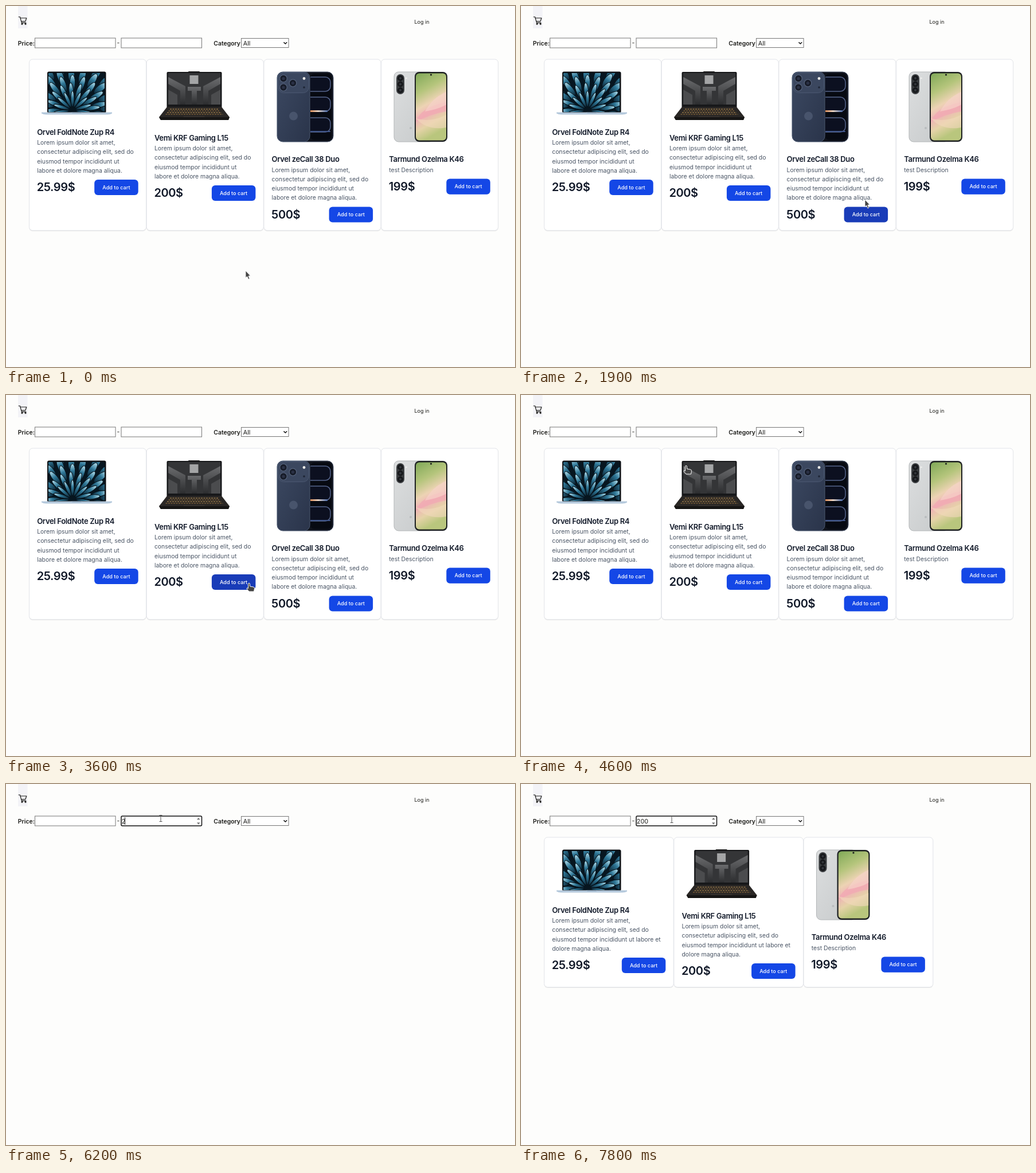
Write an HTML page that moves like this. It is 888 px wide and 630 px high and loops after 8000 ms.

```html
<!DOCTYPE html>
<html lang="en">
<head>
<meta charset="utf-8">
<title>Shop filter</title>
<style>
html, body { margin: 0; width: 100%; height: 100%; overflow: hidden; background: #fdfdfc; }
svg { display: block; }
text { font: 10.42px Inter, "Open Sans", sans-serif; fill: #1b1b18; white-space: pre; }
.label { font-weight: 600; }
.nav { font-size: 9px; }
.field { font-size: 10.8px; }
.title { font-size: 13px; font-weight: 600; letter-spacing: -.33px; fill: #101828; }
.desc { fill: #4a5565; }
.price { font-size: 20px; font-weight: 600; letter-spacing: -.4px; fill: #101828; }
.btn { font-size: 9.1px; font-weight: 500; fill: #fff; text-anchor: middle; }
.box { fill: #fff; stroke: #767676; }
</style>
</head>
<body>
<svg width="888" height="630" viewBox="0 0 888 630">
  <defs>
    <linearGradient id="petal"><stop offset="0" stop-color="#0b2535"/><stop offset=".55" stop-color="#2f7797"/><stop offset="1" stop-color="#b4e0ee"/></linearGradient>
    <linearGradient id="steel" x2="0" y2="1"><stop offset="0" stop-color="#6b6c6e"/><stop offset="1" stop-color="#2c2d2f"/></linearGradient>
    <linearGradient id="navy" x2="1" y2="1"><stop offset="0" stop-color="#3c4962"/><stop offset="1" stop-color="#2a344a"/></linearGradient>
    <linearGradient id="silver" x2="1" y2="1"><stop offset="0" stop-color="#dcdedf"/><stop offset="1" stop-color="#c6c9ca"/></linearGradient>
    <linearGradient id="bloom" x2=".25" y2="1"><stop offset="0" stop-color="#7fa857"/><stop offset=".3" stop-color="#b5c57c"/><stop offset=".52" stop-color="#edd3b4"/><stop offset=".66" stop-color="#efb4b6"/><stop offset=".82" stop-color="#e5d3a8"/><stop offset="1" stop-color="#b9c67d"/></linearGradient>
    <linearGradient id="glow"><stop offset="0" stop-color="#d97b3c"/><stop offset=".5" stop-color="#e8d4c4"/><stop offset="1" stop-color="#4a6aa8"/></linearGradient>
    <clipPath id="lid"><rect x="74" y="117" width="98" height="68" rx="1"/></clipPath>
    <clipPath id="front"><rect x="531" y="118" width="37" height="116" rx="7"/></clipPath>
    <clipPath id="pane"><rect x="715" y="117.500" width="53" height="117" rx="6"/></clipPath>
  </defs>
  <rect width="888" height="630" fill="#fdfdfc"/>
  <rect x="21" width="16.500" height="39" fill="#f3f3f7"/>
  <g fill="none" stroke="#1b1b18" stroke-width="1.200" stroke-linejoin="round" stroke-linecap="round">
    <path d="M22 19h2.400l3 10.300h7.400M24.900 21h10.900l-2 5.800h-7.200"/>
    <circle cx="28" cy="31.300" r="1"/><circle cx="34" cy="31.300" r="1"/>
  </g>
  <text class="nav" x="712.500" y="30.500">Log in</text>
  <text class="label" x="20.800" y="68.500">Price:</text>
  <rect class="box" x="50.500" y="56" width="140.500" height="17"/>
  <text x="193.500" y="68">-</text>
  <rect class="box" id="max" x="201" y="56" width="140.500" height="17"/>
  <path id="spin" d="M333 62.300l2.800-3.500 2.800 3.500zM333 67.300l2.800 3.500 2.800-3.500z" fill="#777"/>
  <text class="field" id="typed" x="201.800" y="68.500"></text>
  <path id="caret" d="M0 58v13" stroke="#111"/>
  <text class="label" x="362.300" y="68.500">Category</text>
  <rect class="box" x="410.500" y="56.500" width="82.500" height="16"/>
  <text class="field" x="413.800" y="68.500">All</text>
  <path d="M484.500 63.200l2.800 2.800 2.800-2.800" fill="none" stroke="#111" stroke-width="1.500"/>
  <g id="wide"></g>
  <g id="narrow"></g>
  <g id="cursor" stroke-linejoin="round">
    <path id="arrow" d="M0 0V12.300L2.800 10 4.900 15 7 14 4.900 9.200 8.300 8.800Z" fill="#444" stroke="#fff" stroke-width=".8"/>
    <path id="hand" d="M-1.500 1.300a1.500 1.500 0 0 1 3 0V5.400l6 1.100q2.200.5 2 2.600L8.600 14.500H0L-4 9.800Q-4.500 8.300-3.100 8.200L-1.500 9.200Z" fill="#444" stroke="#fff"/>
    <path id="beam" d="M-2.500-5.500H2.500M0-5.500v11M-2.500 5.500H2.500" fill="none" stroke="#555"/>
  </g>
</svg>
<script>
const $ = id => document.getElementById(id);
const range = n => [...Array(n).keys()];
const rect = (x, y, w, h, r, fill, more = '') =>
  `<rect x="${x}" y="${y}" width="${w}" height="${h}" rx="${r}" fill="${fill}" ${more}/>`;
const dot = (x, y, r, fill, more = '') => `<circle cx="${x}" cy="${y}" r="${r}" fill="${fill}" ${more}/>`;
const shape = (d, fill, more = '') => `<path d="${d}" fill="${fill}" ${more}/>`;
const text = (cls, x, y, s) => `<text class="${cls}" x="${x}" y="${y}">${s}</text>`;

// Product art, in the coordinates of the four-card layout
function blueLaptop() {
  const petals = range(5).map(ring => range(13 - ring).map(i => {
    const turn = 172 + i * 196 / (12 - ring) + ring % 2 * 7;
    return `<ellipse cx="${76 - ring * 14}" rx="14" ry="${6.5 - ring * .9}" transform="rotate(${turn})"/>`;
  }).join('')).join('');
  return rect(72, 114.5, 102.5, 72.5, 3, '#0c1014') +
    `<g clip-path="url(#lid)">${rect(74, 117, 98, 68, 0, '#071620')}
      <g transform="translate(116 182)" fill="url(#petal)" stroke="#06131c">${petals}</g></g>` +
    shape('M62 185.500H185V187.500Q182 189.500 177 189.500H70Q65 189.500 62 187.500Z', '#b5c9dc') +
    shape('M114 185.500h19l-2 1.500h-15z', '#8da4ba');
}

function darkLaptop() {
  const keys = range(4).map(i => `<path d="M${286 - i * 2.5} ${180 + i * 3}H${371 + i * 2.5}"
    stroke="${i % 2 ? '#8c6a3c' : '#b08a50'}" stroke-width="1.300" stroke-dasharray="3 1.500" opacity=".8"/>`).join('');
  return rect(280.5, 115, 96, 63, 2, '#17181a') + rect(318, 114, 20, 2, 1, '#222') +
    rect(283, 117, 91, 55, 0, '#343537') +
    shape('M283 124L313 140V172H304V148L283 136ZM374 124L344 140V172H353V148L374 136Z', 'url(#steel)') +
    shape('M317 141H340V148H333V172H324V148H317Z', 'url(#steel)') +
    shape('M283 146L299 155V172H283ZM374 146L358 155V172H374Z', '#4b4c4e') +
    rect(320.5, 121, 15, 15, 0, '#a4a5a6') +
    shape('M281 176H376L390 194 388 199H270L267 194Z', '#2a2725') + keys +
    shape('M310 192h36l2 4h-40z', '#35312e') + shape('M267 194H390L388 199H270Z', '#171615');
}

function bluePhone() {
  const lens = (x, y) => dot(x, y, 6.3, '#171c29', 'stroke="#536079" stroke-width="1.300"') + dot(x, y, 2.6, '#2b3145');
  const bands = [124, 159, 195].map(y =>
    rect(515, y, 51, 25, 9, '#0c1020', 'stroke="#56658c" stroke-width="1.500"')).join('');
  return rect(512, 115, 59, 122, 10, '#10131c', 'stroke="#505b70"') +
    `<g clip-path="url(#front)">${rect(525, 116, 48, 120, 0, '#070a12')}${bands}
      ${rect(528, 182, 33, 3, 1, 'url(#glow)')}${rect(528, 218, 38, 2, 1, '#40568a')}</g>` +
    rect(473, 115, 57, 122, 10, 'url(#navy)', 'stroke="#4a5870"') +
    rect(474.5, 116.5, 54, 35, 10, '#3b475f', 'stroke="#4b5871"') +
    lens(484, 126.5) + lens(484, 142) + lens(500.5, 134.5) +
    dot(520, 126.5, 2.4, '#e8e8e6') + dot(520, 142, 1.8, '#1e2534') + dot(501.5, 192, 7.5, '#48546c');
}

function silverPhone() {
  return rect(677, 115, 70, 122, 8, 'url(#silver)', 'stroke="#b3b6b8"') +
    rect(681, 119, 14, 35, 7, '#3b3e41') +
    [126, 136.5, 147].map(y => dot(688, y, 5, '#16181b') + dot(688, y, 2, '#34383d')).join('') +
    dot(698.5, 126, 1.3, '#f2f2ef') + dot(706, 213, 2, '#b9bcbe') +
    rect(713, 115, 57, 122, 8, '#1d2022') +
    `<g clip-path="url(#pane)">${rect(715, 117, 53, 118, 0, 'url(#bloom)')}
      ${shape('M715 202Q724 176 768 168V184Q742 188 715 202Z', '#f2a9b3', 'opacity=".75"')}
      ${shape('M768 150Q744 160 731 184Q756 180 768 172Z', '#f7d3c9', 'opacity=".7"')}
      ${shape('M715 196Q740 204 768 190V212Q735 218 715 196Z', '#f4d9bd', 'opacity=".6"')}</g>` +
    dot(741.5, 120, 1.6, '#17191b');
}

const longText = {
  wide: ['Lorem ipsum dolor sit amet,', 'consectetur adipiscing elit, sed do', 'eiusmod tempor incididunt ut', 'labore et dolore magna aliqua.'],
  narrow: ['Lorem ipsum dolor sit amet,', 'consectetur adipiscing elit, sed do', 'eiusmod tempor incididunt ut labore et', 'dolore magna aliqua.']
};
const shortText = { wide: ['test Description'], narrow: ['test Description'] };
const products = [
  { name: 'Orvel FoldNote Zup R4', price: '25.99$', y: 220, copy: longText, art: blueLaptop },
  { name: 'Vemi KRF Gaming L15', price: '200$', y: 230, copy: longText, art: darkLaptop },
  { name: 'Orvel zeCall 38 Duo', price: '500$', y: 267.5, copy: longText, art: bluePhone },
  { name: 'Tarmund Ozelma K46', price: '199$', y: 267.5, copy: shortText, art: silverPhone }
];
const LEFT = 40.2, WIDE = 204.7;

function card(p, slot, width, height, mode) {
  const x = LEFT + slot * width, home = LEFT + products.indexOf(p) * WIDE;
  const lines = p.copy[mode], end = p.y + 18.3 + (lines.length - 1) * 16.3;
  const bx = x + width - 90.7, by = end + 15.7;
  return rect(x + .3, 94.5, width - .6, height, 6, '#000', 'opacity=".07"') +
    rect(x + .3, 93, width - .6, height, 6, '#fff', 'stroke="#e2e4e9"') +
    `<g transform="translate(${x - home})">${p.art()}</g>` +
    text('title', x + 14, p.y + 4.8, p.name) +
    lines.map((s, i) => text('desc', x + 14, p.y + 22 + i * 16.3, s)).join('') +
    text('price', x + 13.5, end + 36, p.price) +
    rect(bx, by, 76.5, 27.2, 6, '#1447e6', `id="${mode}${products.indexOf(p)}"`) +
    text('btn', bx + 38.2, by + 16.9, 'Add to cart');
}
$('wide').innerHTML = products.map((p, i) => card(p, i, WIDE, 298.7, 'wide')).join('');
$('narrow').innerHTML = products.filter(p => p.price !== '500$')
  .map((p, i) => card(p, i, 226.3, 261.5, 'narrow')).join('');

// Pointer runs: start time, then one point per 100 ms
const STEP = 100;
const runs = [
  [0, [[418, 462]]],
  [1400, [[438, 447], [485, 420], [548, 393], [606, 371], [658, 359], [600, 338], [510, 320], [408, 323], [320, 335]]],
  [2300, [[299, 352], [342, 390], [424, 417], [473, 408]]],
  [3300, [[446, 398], [408, 378]]],
  [3600, [[424, 328.5], [417, 324], [405, 318], [388, 300], [366, 274], [340, 245], [314, 217], [290, 190], [276, 169]]],
  [4500, [[280, 146], [288, 123.5], [283, 103], [277, 82], [272, 65], [270, 60]]],
  [7500, [[266, 61], [263, 62]]]
];
const last = (list, t) => list.filter(e => e[0] <= t).pop();
// Pointer kind, typed text and hovered button by start time
const kinds = [[0, 'arrow'], [1700, 'hand'], [1800, 'arrow'], [2100, 'hand'], [2200, 'arrow'], [3600, 'hand'],
  [3900, 'arrow'], [4200, 'hand'], [4700, 'arrow'], [4900, 'beam']];
const typing = [[0, '', 0], [6200, '2', 207.5], [6600, '20', 214.5], [6900, '200', 222], [7800, '200', 0]];
const hovers = [[0, ''], [1700, 'wide2'], [2000, ''], [2100, 'wide1'], [2200, ''], [3600, 'wide1'], [3900, '']];
const show = (id, on) => $(id).style.display = on ? '' : 'none';

function draw(t) {
  const [start, pts] = last(runs, t);
  const [x, y] = pts[Math.min(pts.length - 1, Math.floor((t - start) / STEP))];
  $('cursor').setAttribute('transform', `translate(${x} ${y})`);
  const kind = last(kinds, t)[1];
  ['arrow', 'hand', 'beam'].forEach(k => show(k, k === kind));

  const hot = last(hovers, t)[1];
  ['wide1', 'wide2'].forEach(id => $(id).setAttribute('fill', id === hot ? '#193cb8' : '#1447e6'));

  const focus = t >= 5300, max = $('max');
  max.style.stroke = focus ? '#101010' : '';
  max.style.strokeWidth = focus ? 1.5 : 1;
  max.setAttribute('rx', focus ? 2 : 0);
  show('spin', t >= 4900);

  const [, value, caretX] = last(typing, t);
  $('typed').textContent = value;
  show('caret', caretX);
  $('caret').setAttribute('transform', `translate(${caretX})`);
  show('wide', t < 6200);
  show('narrow', t >= 6900);
}

const begin = performance.now();
function tick() {
  draw((performance.now() - begin) % 8000);
  requestAnimationFrame(tick);
}
tick();
</script>
</body>
</html>
```
